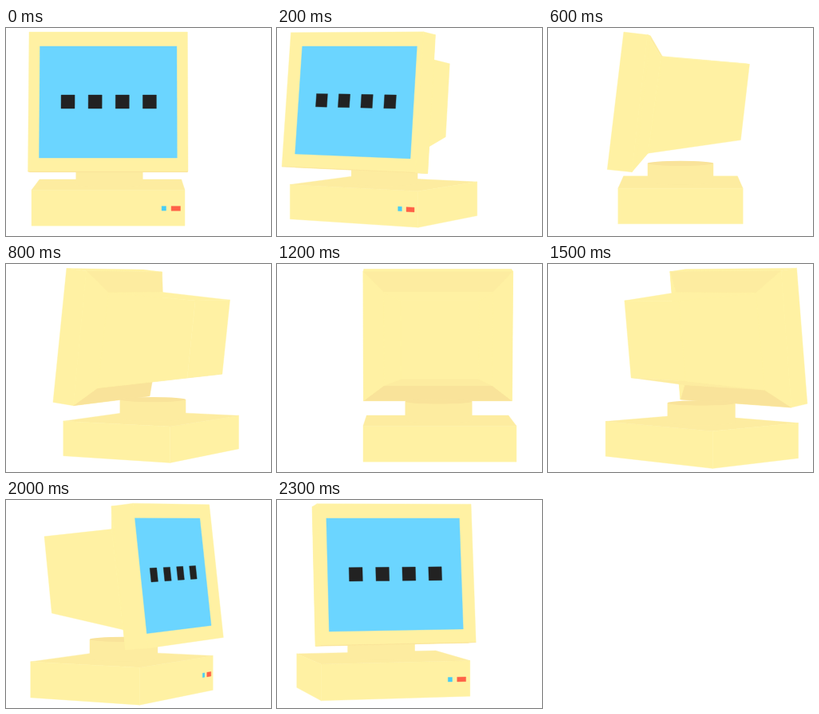
Write an HTML page with a canvas that moves like this. It is 332 by 261 pixels and loops after 2400 ms.

```html
<!DOCTYPE html>
<html lang="en">
<head>
<meta charset="utf-8">
<title>Turning computer</title>
<style>
html, body { margin: 0; width: 100%; height: 100%; overflow: hidden; background: #fff; }
canvas { display: block; }
</style>
</head>
<body>
<canvas id="stage" width="332" height="261"></canvas>
<script>
const ctx = document.getElementById('stage').getContext('2d');
const STEPS = 24, STEP_MS = 100;
const CX = 166, HORIZON = 25, CAMERA = 1980, MID = -36.5;
const CREAM = '#fff1a3', SOFT = '#fdeca0', SHADE = '#f9e39a';
let cos = 1, sin = 0;

// Turn a model point about the vertical axis and project it.
function project([x, y, z]) {
  const s = CAMERA / (CAMERA - x * sin - z * cos);
  return [CX + (x * cos - z * sin) * s, HORIZON + y * s, s];
}

// Fill a face if it turns towards the viewer.
function face(points, color) {
  const p = points.map(project);
  const area = p.reduce((sum, [x, y], i) => {
    const [nx, ny] = p[(i + 1) % p.length];
    return sum + x * ny - nx * y;
  }, 0);
  if (area <= 0) return false;
  ctx.beginPath();
  p.forEach(([x, y]) => ctx.lineTo(x, y));
  ctx.closePath();
  ctx.fillStyle = ctx.strokeStyle = color;
  ctx.lineWidth = 0.4;
  ctx.fill();
  ctx.stroke();
  return true;
}

// Upright section, tilted by different depths at top and bottom.
function section(half, top, topZ, bottom, bottomZ) {
  const l = MID - half, r = MID + half;
  return [[l, top, topZ], [r, top, topZ], [r, bottom, bottomZ], [l, bottom, bottomZ]];
}

// Solid between a front and a rear section; detail goes on the front face.
function solid(a, b, topColor, bottomColor, detail) {
  face([b[1], b[0], b[3], b[2]], CREAM);
  if (face(a, CREAM) && detail) detail();
  face([b[0], b[1], a[1], a[0]], topColor);
  face([a[3], a[2], b[2], b[3]], bottomColor);
  face([a[1], b[1], b[2], a[2]], CREAM);
  face([b[0], a[0], a[3], b[3]], CREAM);
}

function panel(x, y, w, h, depth, color) {
  face([[x, y], [x + w, y], [x + w, y + h], [x, y + h]]
    .map(([px, py]) => [px, py, depth(py)]), color);
}

const rim = section(95.75, -19.3, 69, 148, 89);
const rear = section(95.75, -16, 40, 151, 59);
const throat = section(69, 11, 24, 130, 40);
const tail = section(47, 20.5, -86, 115, -75);
const baseFront = section(92.3, 171.3, 76, 214.6, 76);
const baseRear = section(92.3, 171.3, -76, 214.6, -76);

const screenDepth = y => 62.3 + 0.12 * (y + 2);
const baseDepth = () => 76;

function drawScreen() {
  panel(-119.6, -2, 166, 134.5, screenDepth, '#6bd5ff');
  for (let i = 0; i < 4; i++) panel(-93.5 + i * 32.9, 57, 16.4, 16.3, screenDepth, '#222');
}

function drawLights() {
  panel(28, 191, 5.2, 5.3, baseDepth, '#47cdf5');
  panel(39.5, 191, 11, 5.5, baseDepth, '#ff6147');
}

function drawNeck() {
  const [x, top, s] = project([MID, 147.5, 0]);
  const bottom = project([MID, 171.3, 0])[1];
  const r = 42 * s;
  ctx.fillStyle = SOFT;
  ctx.beginPath();
  ctx.ellipse(x, bottom, r, 3.6, 0, 0, Math.PI);
  ctx.lineTo(x - r, top);
  ctx.lineTo(x + r, top);
  ctx.fill();
  ctx.fillStyle = SHADE;
  ctx.beginPath();
  ctx.ellipse(x, top, r, 3.1, 0, 0, 7);
  ctx.fill();
}

function drawMonitor(facing) {
  const parts = [
    () => solid(throat, tail, CREAM, SOFT),
    () => solid(rear, throat, SOFT, SHADE),
    () => solid(rim, rear, CREAM, SHADE, drawScreen)
  ];
  if (!facing) parts.reverse();
  parts.forEach(draw => draw());
}

function frame() {
  const angle = Math.floor(performance.now() / STEP_MS) % STEPS * 2 * Math.PI / STEPS;
  cos = Math.cos(angle);
  sin = Math.sin(angle);
  const facing = cos > 0;
  ctx.fillStyle = '#fff';
  ctx.fillRect(0, 0, 332, 261);
  solid(baseFront, baseRear, SOFT, SHADE, drawLights);
  if (facing) drawNeck();
  drawMonitor(facing);
  if (!facing) drawNeck();
  requestAnimationFrame(frame);
}
frame();
</script>
</body>
</html>
```
